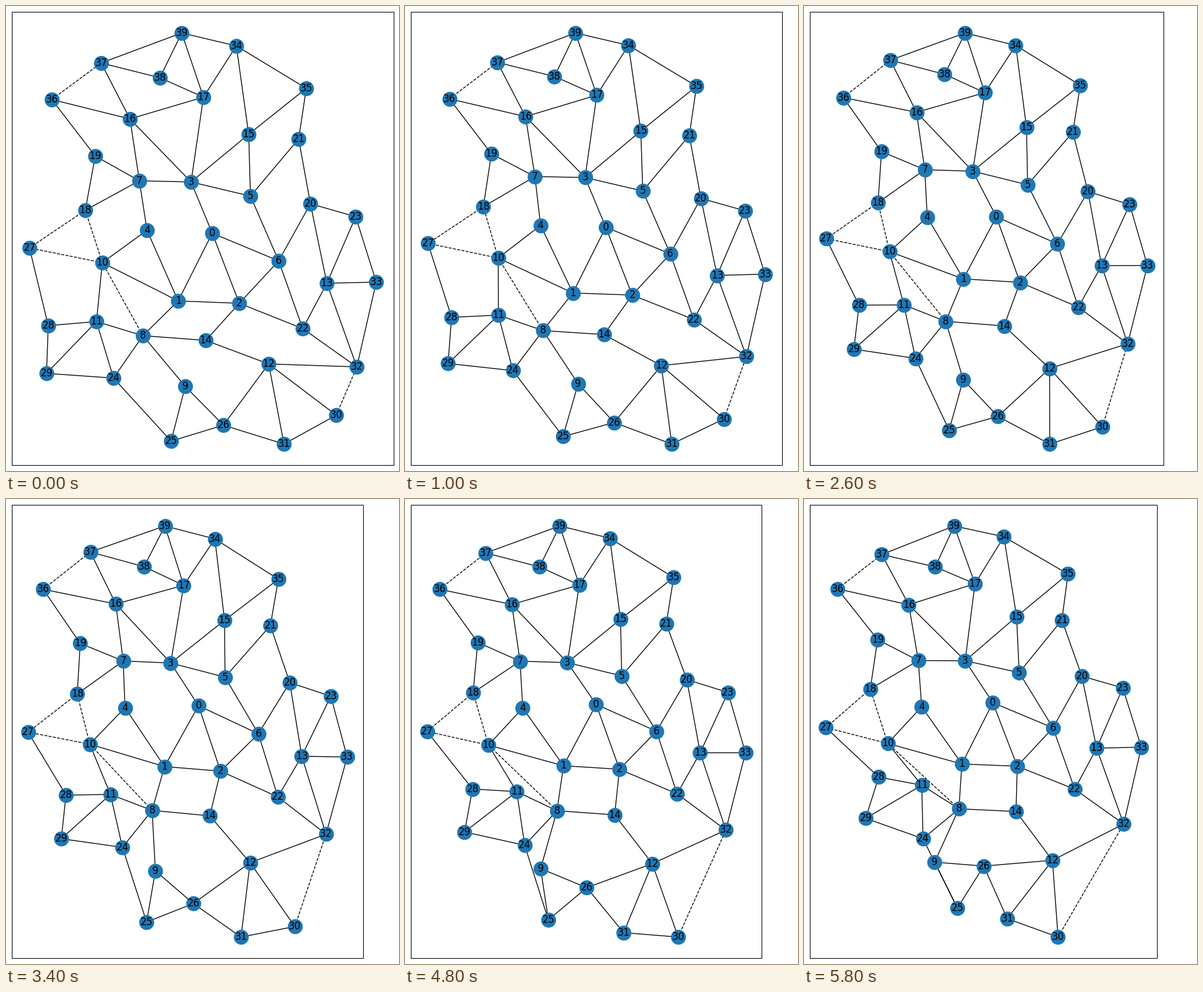
A matplotlib script that plays this animation: 669 px wide and 790 px high, repeating every 6 s.

```python
import numpy as np
import matplotlib.pyplot as plt
from matplotlib.animation import FuncAnimation
from matplotlib.collections import LineCollection
from matplotlib.patches import Rectangle

WIDTH, HEIGHT, DPI = 669, 790, 100
FRAMES, INTERVAL = 30, 200

# Frame box: left/top edge, height, and the vertical span filled by the graph
EDGE, BOX_H = 10.4, 770
TOP, SPAN = 45.8, 698.4

# Joints of the linkage at rest, 0 to 39
REST = np.array([
    (351, 386), (293, 501), (397, 505), (315, 299), (240, 381),
    (416, 323), (464, 433), (227, 297), (233, 560), (305, 646),
    (164, 436), (154, 536), (447, 608), (546, 471), (340, 568),
    (413, 218), (211, 192), (336, 155), (135, 347), (152, 255),
    (518, 336), (498, 226), (505, 548), (595, 358), (183, 632),
    (281, 739), (370, 712), (40, 411), (72, 543), (69, 624),
    (562, 695), (473, 744), (597, 613), (630, 469), (392, 68),
    (511, 140), (78, 159), (162, 97), (262, 122), (299, 46),
], float)

BARS = {
    0: (1, 2, 3, 6), 1: (2, 4, 8, 10), 2: (6, 14, 22), 3: (5, 7, 15, 16, 17),
    4: (7, 10), 5: (6, 15, 21), 6: (20, 22), 7: (16, 18, 19),
    8: (9, 11, 14, 24), 9: (25, 26), 10: (11,), 11: (24, 28, 29),
    12: (14, 26, 30, 31, 32), 13: (20, 22, 23, 32, 33), 15: (34, 35),
    16: (17, 36, 37), 17: (34, 38, 39), 18: (19,), 19: (36,), 20: (21, 23),
    21: (35,), 22: (32,), 23: (33,), 24: (25, 29), 25: (26,), 26: (31,),
    27: (28,), 28: (29,), 30: (31,), 32: (33,), 34: (35, 39), 37: (38, 39),
    38: (39,),
}
CABLES = [(8, 10), (10, 18), (10, 27), (18, 27), (30, 32), (36, 37)]

# Rigid plates
RIGHT = [1, 2, 6, 13, 20, 22, 23, 32, 33]
UPPER = [5, 7, 15, 16, 17, 21, 34, 35, 37, 38, 39]
LOWER = [11, 24, 28, 29]
TAIL = [26, 30, 31]

# Rotation from rest, in degrees, at a few key times
KEYS = np.array([0, 5, 9, 13, 17, 24, 29]) / (FRAMES - 1)
TURNS = {
    "right": (0, -0.16, 0.23, 1.28, 2.45, 1.34, 0.08),
    "neck": (0, -0.14, -1.5, -5, -10.6, -12.1, -11),
    "upper": (0, -0.22, -0.1, 0.5, 1.18, 0.4, -1.06),
    "ear": (0, -0.84, -1.93, -2.62, -2.53, -2.09, -1.45),
    "elbow": (0, -1.7, -3.4, -6.5, -10.1, -11.4, -11.3),
    "hip": (0, -6.9, -14.4, -22.9, -29.6, -37.2, -41.7),
    "lower": (0, 2.2, 3.8, 4.5, 4, 8.4, 15.5),
    "hand": (0, -4.1, -7.9, -12.7, -17.5, -24.8, -33.3),
    "tail": (0, 3.2, 6.2, 10.7, 17.8, 33.4, 48.7),
}


def spline(keys, values, t):
    """Natural cubic spline through the key values, evaluated at t."""
    line = np.vander(keys, 2)
    system = np.block([[abs(keys[:, None] - keys) ** 3, line],
                       [line.T, np.zeros((2, 2))]])
    coef = np.linalg.solve(system, [*values, 0, 0])
    return np.hstack([abs(t[:, None] - keys) ** 3, np.vander(t, 2)]) @ coef


def swing(p, pivot, nodes, degrees):
    """Turn nodes as one plate about a pivot."""
    a = np.radians(degrees)
    rotation = [[np.cos(a), np.sin(a)], [-np.sin(a), np.cos(a)]]
    p[nodes] = p[pivot] + (REST[nodes] - REST[pivot]) @ rotation


def join(p, node, a, b):
    """Place a node where its bars to a and b meet, on its rest side."""
    ra, rb = (np.hypot(*(REST[node] - REST[end])) for end in (a, b))
    d = np.hypot(*(p[b] - p[a]))
    ux, uy = (p[b] - p[a]) / d
    along = (ra**2 - rb**2 + d**2) / (2 * d)
    rise = np.sqrt(max(ra**2 - along**2, 0))
    (bx, by), (nx, ny) = REST[b] - REST[a], REST[node] - REST[a]
    rise *= np.sign(bx * ny - by * nx)
    p[node] = p[a] + (along * ux - rise * uy, along * uy + rise * ux)


def pose(turn):
    """Build the linkage outward from joint 0."""
    p = REST.copy()
    swing(p, 0, RIGHT, turn["right"])
    swing(p, 0, [3], turn["neck"])
    swing(p, 3, UPPER, turn["upper"])
    swing(p, 16, [36], turn["ear"])
    join(p, 19, 36, 7)
    join(p, 18, 7, 19)
    swing(p, 1, [4, 10], turn["elbow"])
    swing(p, 1, [8], turn["hip"])
    join(p, 14, 8, 2)
    swing(p, 8, LOWER, turn["lower"])
    swing(p, 28, [27], turn["hand"])
    join(p, 12, 14, 32)
    swing(p, 12, TAIL, turn["tail"])
    join(p, 25, 24, 26)
    join(p, 9, 25, 26)
    return p


def fit(p):
    """Scale a pose to the fixed height; return it with the box width."""
    p = p - p.min(axis=0)
    p = p * SPAN / p[:, 1].max()
    width = p[:, 0].max()
    return p + (EDGE + 0.05 * width, TOP), 1.1 * width


times = np.linspace(0, 1, FRAMES)
curves = {name: spline(KEYS, values, times) for name, values in TURNS.items()}
track = [fit(pose({name: c[i] for name, c in curves.items()}))
         for i in range(FRAMES)]
bars = np.array([(a, b) for a, ends in BARS.items() for b in ends])
cables = np.array(CABLES)

fig = plt.figure(figsize=(WIDTH / DPI, HEIGHT / DPI), dpi=DPI, facecolor="white")
ax = fig.add_axes([0, 0, 1, 1])
ax.set_xlim(0, WIDTH)
ax.set_ylim(HEIGHT, 0)
ax.axis("off")

pts, box_w = track[0]
box = ax.add_patch(Rectangle((EDGE, EDGE), box_w, BOX_H, fill=False,
                             ec="black", lw=0.8, zorder=2.5))
bar_lines = ax.add_collection(
    LineCollection(pts[bars], colors="black", linewidths=1, zorder=1), autolim=False)
cable_lines = ax.add_collection(
    LineCollection(pts[cables], colors="black", linewidths=1,
                   linestyles="dashed", zorder=1), autolim=False)
dots = ax.scatter(pts[:, 0], pts[:, 1], s=300, c="#1f77b4", zorder=2)
labels = [ax.text(x, y, str(i), size=12, family="DejaVu Sans", color="black",
                  ha="center", va="center", zorder=3)
          for i, (x, y) in enumerate(pts)]


def update(frame):
    pts, box_w = track[frame]
    box.set_width(box_w)
    bar_lines.set_segments(pts[bars])
    cable_lines.set_segments(pts[cables])
    dots.set_offsets(pts)
    for label, point in zip(labels, pts):
        label.set_position(point)
    return [box, bar_lines, cable_lines, dots, *labels]


anim = FuncAnimation(fig, update, frames=FRAMES, interval=INTERVAL,
                     repeat=True, repeat_delay=0, blit=False)
plt.show()
```
